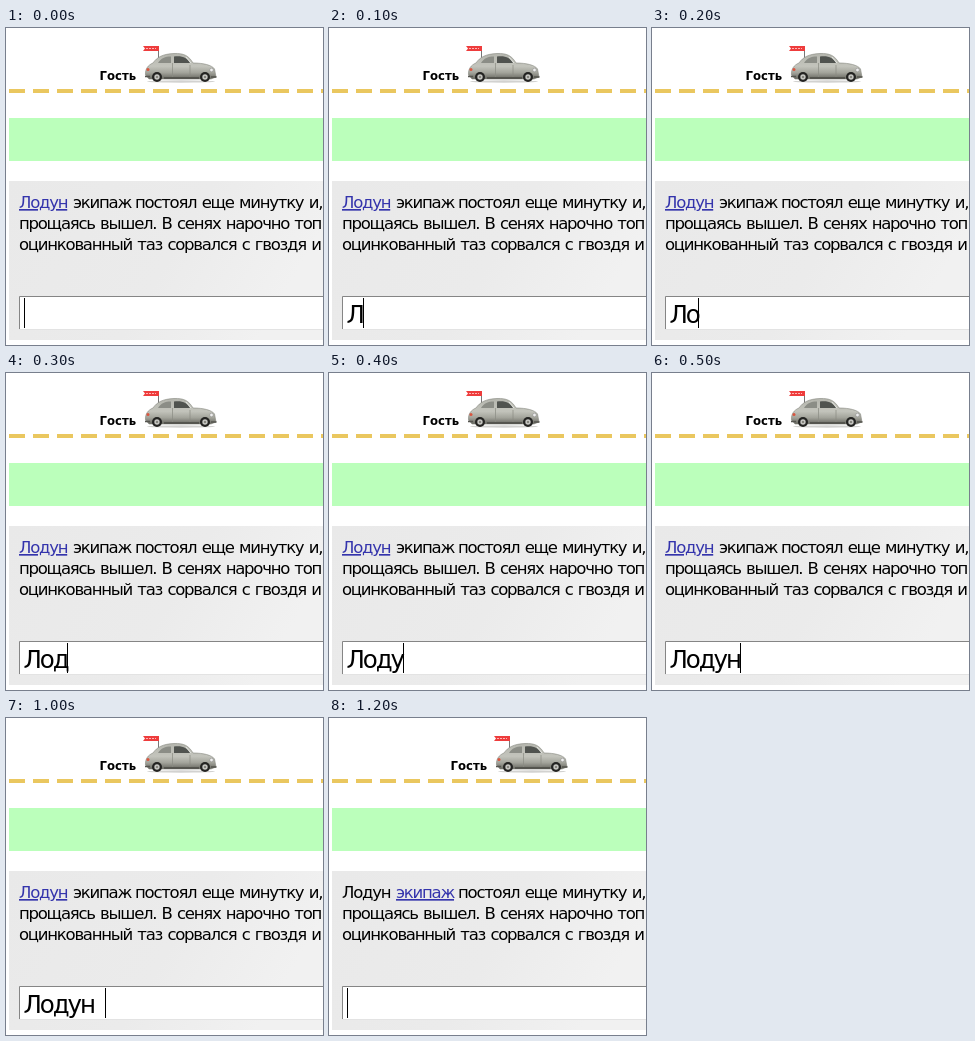
These frames come from a looping animation (317 by 317 pixels, 2700 ms). An HTML page:

```html
<!DOCTYPE html>
<html lang="ru">
<head>
<meta charset="utf-8">
<title>Гонка</title>
<style>
  html, body { margin: 0; width: 100%; height: 100%; overflow: hidden; background: #fff; }
  svg { display: block; width: 100vw; height: 100vh; }
  text { font-family: "DejaVu Sans", sans-serif; white-space: pre; }
  .passage { font-size: 16.5px; letter-spacing: -1.25px; word-spacing: 1.3px; }
  .link { fill: #3434ac; text-decoration: underline; text-decoration-thickness: 1px; }
  #typed { font-size: 24.5px; letter-spacing: -2.1px; }
  .guest { font-size: 11.7px; font-weight: bold; }
</style>
</head>
<body>
<svg viewBox="0 0 317 317">
  <defs>
    <linearGradient id="panel" x1="0" y1="0" x2="1" y2=".3">
      <stop offset="0" stop-color="#e9e9e9"/>
      <stop offset=".6" stop-color="#ebebeb"/>
      <stop offset="1" stop-color="#f1f1f1"/>
    </linearGradient>
    <linearGradient id="paint" x1="0" y1="0" x2="0" y2="1">
      <stop offset="0" stop-color="#b4b5ad"/>
      <stop offset=".5" stop-color="#c3c4bc"/>
      <stop offset=".75" stop-color="#a3a49b"/>
      <stop offset="1" stop-color="#66665f"/>
    </linearGradient>
    <g id="wheel">
      <circle r="5" fill="#242422"/>
      <circle r="2.7" fill="#c4c4c0"/>
      <circle r="1.1" fill="#77776f"/>
    </g>
  </defs>

  <path d="M3 63H317" stroke="#eac75f" stroke-width="4" stroke-dasharray="16 8"/>

  <g id="racer">
    <text class="guest" x="93.5" y="51.5">Гость</text>
    <ellipse cx="175" cy="53.5" rx="34" ry="1.2" fill="#d2d2d0"/>
    <path d="M152.5 18V34" stroke="#777"/>
    <path d="M137 18H153V23H137L139 20.5Z" fill="#ee3c3c"/>
    <path d="M140 20.5H150" stroke="#ffb5b5" stroke-dasharray="2 1"/>
    <path d="M139.5 47C139 41 142 37 147 35C151 29 157 26 168 25.5C178 25 183 28 187 35
             C197 35 206 37 208.5 41L210 49L205 51H143Z" fill="url(#paint)" stroke="#85867e" stroke-width=".6"/>
    <path d="M152 35C155 30 159 28.5 165 28.5V35Z" fill="#8b8d86"/>
    <path d="M168 28.5C177 27.5 181 30 184 35H168Z" fill="#50534f"/>
    <path d="M180 29L185 35" stroke="#e4e6e2"/>
    <path d="M166.5 35V49M184 37V49" stroke="#8a8b83" stroke-width=".7"/>
    <path d="M158 50H193" stroke="#4b4b46" stroke-width="1.6"/>
    <circle cx="142" cy="41.5" r="1.5" fill="#d9553f"/>
    <circle cx="205.5" cy="42" r="1.8" fill="#eee" stroke="#888" stroke-width=".5"/>
    <path d="M139 48.5H144M205 49H210.5" stroke="#55554f" stroke-width="1.5"/>
    <use href="#wheel" x="151" y="49"/>
    <use href="#wheel" x="199" y="49"/>
  </g>

  <path d="M3 90H317V133H3Z" fill="#bfb"/>
  <path d="M3 153H317V312H3Z" fill="url(#panel)"/>

  <g class="passage">
    <text id="word0" x="13" y="180">Лодун</text>
    <text id="word1" x="67" y="180">экипаж</text>
    <text x="129" y="180">постоял еще минутку и,</text>
    <text x="13" y="201">прощаясь вышел. В сенях нарочно топ</text>
    <text x="13" y="222">оцинкованный таз сорвался с гвоздя и</text>
  </g>

  <path d="M13 268H317V302H13Z" fill="#e3e3e3"/>
  <path d="M14 269H317V301H14Z" fill="#fff"/>
  <path d="M13.5 301V268.5H317" fill="none" stroke="#858585"/>
  <text id="typed" x="17.5" y="294.5"></text>
  <path id="caret" d="M.5 270V300" stroke="#000"/>
</svg>
<script>
  const LOOP = 2700, KEY = 100, SPACE_AT = 1000, NEXT_AT = 1200;
  const NAME = "Лодун";
  const caretStops = [18, 34, 46, 61, 74, 88, 99];
  const find = id => document.getElementById(id);
  const [racer, typed, caret, ...words] =
    ["racer", "typed", "caret", "word0", "word1"].map(find);

  function keysPressed(t) {
    if (t >= NEXT_AT) return 0;
    if (t >= SPACE_AT) return NAME.length + 1;
    return Math.min(NAME.length, Math.floor(t / KEY));
  }

  function draw(t) {
    const keys = keysPressed(t);
    const current = t >= NEXT_AT ? 1 : 0;
    typed.textContent = NAME.slice(0, keys);
    caret.setAttribute("transform", `translate(${caretStops[keys]})`);
    racer.setAttribute("transform", `translate(${current * 28})`);
    words.forEach((word, i) => word.classList.toggle("link", i === current));
  }

  const start = performance.now();
  function tick() {
    draw((performance.now() - start) % LOOP);
    requestAnimationFrame(tick);
  }
  tick();
</script>
</body>
</html>
```
